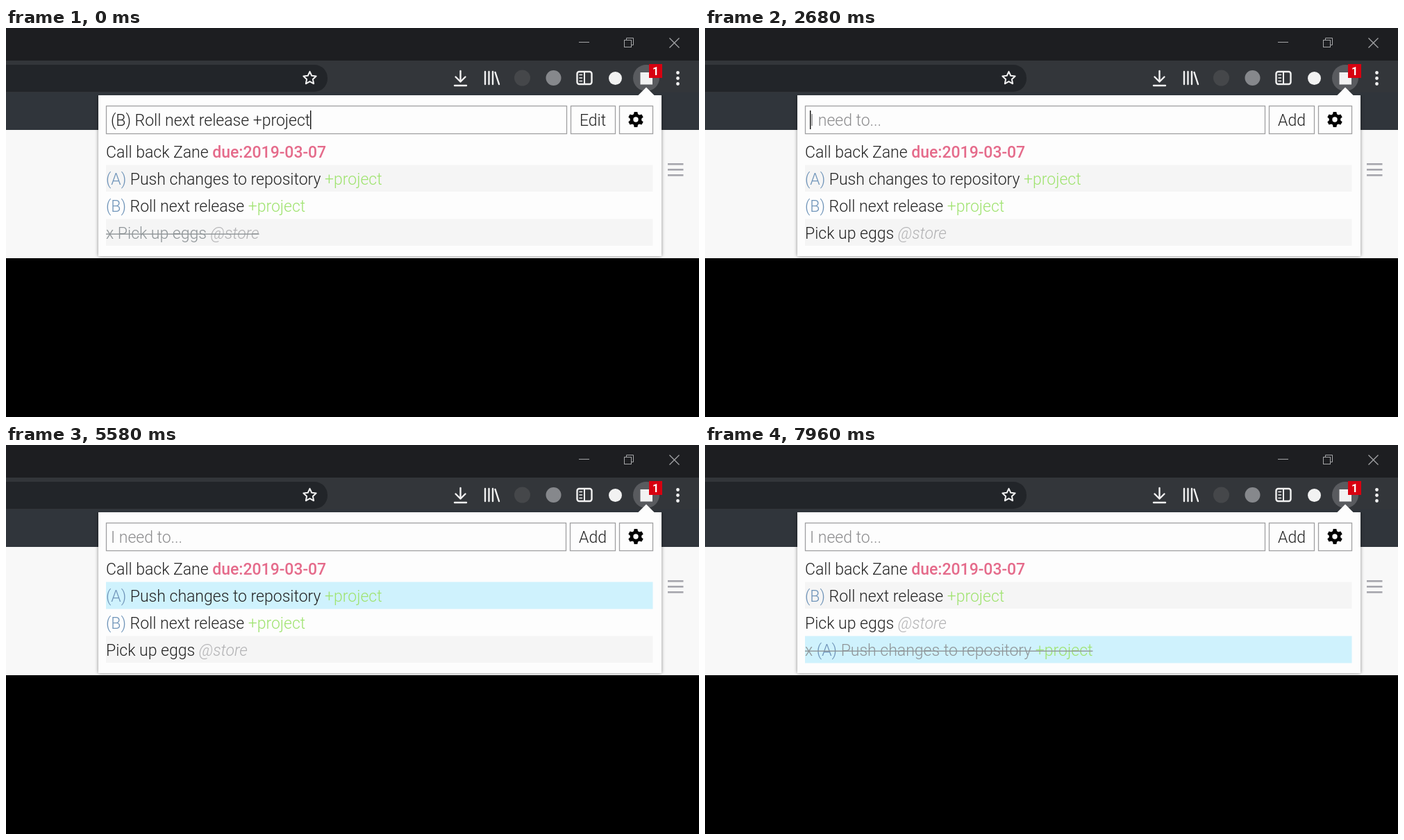
Write an HTML page with a canvas that moves like this. It is 998 by 561 pixels and loops after 8000 ms.

```html
<!DOCTYPE html>
<html lang="en">
<head>
<meta charset="utf-8">
<title>Todo popup</title>
<style>
html, body { margin: 0; width: 100%; height: 100%; overflow: hidden; background: #000; }
canvas { display: block; }
</style>
</head>
<body>
<canvas id="stage" width="998" height="561"></canvas>
<script>
const ctx = document.getElementById('stage').getContext('2d');
const LOOP = 8000;
const SIZE = 23;
const ROW_TOP = 158.5, ROW_H = 39;
const INK = '#222', BLUE = '#6f94b9', GREEN = '#9fe36f', PINK = '#e56b8b', GREY = '#b2b2b4', DONE = '#8f9598';

const call = [['Call back Zane ', INK], ['due:2019-03-07', PINK, '500']];
const push = [['(A)', BLUE], [' Push changes to repository ', INK], ['+project', GREEN]];
const roll = [['(B)', BLUE], [' Roll next release ', INK], ['+project', GREEN]];
const eggs = [['Pick up eggs ', INK], ['@store', GREY, 'italic 300']];

// Each state holds from its time until the next one.
const states = [
  { at: 0, rows: [call, push, roll, eggs], done: true, edit: true },
  { at: 20, rows: [call, push, roll, eggs] },
  { at: 1960, rows: [call, push, roll, eggs], caret: true },
  { at: 2800, rows: [call, push, roll, eggs], focus: 0 },
  { at: 3920, rows: [call, push, roll, eggs], focus: 1 },
  { at: 5600, rows: [call, roll, eggs, push], done: true, focus: 3 }
];

function box(x, y, w, h, color) {
  ctx.fillStyle = color;
  ctx.fillRect(x, y, w, h);
}

function dot(x, y, r, color) {
  ctx.fillStyle = color;
  ctx.beginPath();
  ctx.arc(x, y, r, 0, Math.PI * 2);
  ctx.fill();
}

function rounded(x, y, w, h, r) {
  ctx.beginPath();
  ctx.roundRect(x, y, w, h, r);
}

function line(color, width, ...points) {
  ctx.strokeStyle = color;
  ctx.lineWidth = width;
  ctx.beginPath();
  points.forEach(([x, y], i) => i ? ctx.lineTo(x, y) : ctx.moveTo(x, y));
  ctx.stroke();
}

function text(str, x, y, color, style = '300', size = SIZE) {
  ctx.font = `${style} ${size}px Roboto, sans-serif`;
  ctx.fillStyle = color;
  ctx.fillText(str, x, y);
  return x + ctx.measureText(str).width;
}

function windowButtons() {
  line('#a5a6a8', 1, [825, 20.5], [840, 20.5]);
  ctx.strokeRect(890.5, 17.5, 10, 10);
  line('#a5a6a8', 1, [893.5, 17], [893.5, 14.5], [903.5, 14.5], [903.5, 24.5], [901, 24.5]);
  line('#a5a6a8', 1.2, [955.5, 14.5], [969.5, 28.5]);
  line('#a5a6a8', 1.2, [969.5, 14.5], [955.5, 28.5]);
}

function star(cx, cy) {
  ctx.beginPath();
  for (let i = 0; i < 10; i++) {
    const a = -Math.PI / 2 + i * Math.PI / 5, r = i % 2 ? 4.6 : 9.6;
    ctx.lineTo(cx + r * Math.cos(a), cy + r * Math.sin(a));
  }
  ctx.closePath();
  ctx.strokeStyle = '#f2f2f2';
  ctx.lineWidth = 2;
  ctx.stroke();
}

function toolbarIcons() {
  const white = '#f2f2f2';
  ctx.lineJoin = ctx.lineCap = 'round';
  star(437.5, 72.5);
  line(white, 2.4, [654.5, 62], [654.5, 77]);
  line(white, 2.4, [647.5, 70.5], [654.5, 77.5], [661.5, 70.5]);
  line(white, 2.4, [646, 83], [663, 83]);
  for (const x of [690, 695.5, 701]) line(white, 2.4, [x, 63], [x, 81]);
  line(white, 2.4, [704.5, 64], [710, 81]);
  dot(743.5, 72, 11.5, '#45474a');
  dot(788.5, 72, 11, '#86888c');
  ctx.strokeStyle = white;
  ctx.lineWidth = 2.4;
  rounded(822.5, 63, 21, 18, 3);
  ctx.stroke();
  line(white, 2, [833, 63], [833, 81]);
  for (const y of [67.5, 72, 76.5]) line(white, 1.6, [826, y], [829.5, y]);
  dot(877.5, 72.5, 9.5, white);
  dot(922, 72, 19, '#595b5f');
  box(913.5, 64, 17.5, 17.5, white);
  box(926, 52, 19, 20, '#d70010');
  ctx.textAlign = 'center';
  text('1', 935.5, 67.5, '#fff', '700', 16);
  ctx.textAlign = 'left';
  for (const y of [64.5, 72.5, 80.5]) dot(967.5, y, 2.4, white);
  ctx.lineJoin = 'miter';
  ctx.lineCap = 'butt';
}

function browser() {
  box(0, 0, 998, 561, '#000');
  box(0, 0, 998, 47, '#1d1e21');
  box(0, 47, 998, 100, '#33363a');
  box(0, 93, 998, 54, '#30353b');
  ctx.fillStyle = '#222529';
  rounded(-30, 53, 493, 39, 19);
  ctx.fill();
  box(0, 147, 998, 185, '#f8f8f8');
  for (const y of [195, 203, 211]) box(953, y, 22.5, 2.6, '#a6a6ad');
  windowButtons();
  toolbarIcons();
}

function gear(cx, cy) {
  dot(cx, cy, 8.3, '#000');
  for (let i = 0; i < 6; i++) {
    ctx.save();
    ctx.translate(cx, cy);
    ctx.rotate(i * Math.PI / 3);
    ctx.beginPath();
    ctx.moveTo(-3.4, -6);
    ctx.lineTo(-2.3, -11);
    ctx.lineTo(2.3, -11);
    ctx.lineTo(3.4, -6);
    ctx.fill();
    ctx.restore();
  }
  dot(cx, cy, 3.7, '#fdfdfd');
}

function frame(x, right) {
  ctx.strokeStyle = '#a0a0a2';
  ctx.lineWidth = 1.3;
  ctx.strokeRect(x, 112.5, right - x, 40);
}

function popup() {
  ctx.save();
  ctx.beginPath();
  ctx.rect(0, 97, 998, 235);
  ctx.clip();
  ctx.shadowColor = 'rgba(0,0,0,.45)';
  ctx.shadowBlur = 5;
  box(133, 97, 811, 232, '#fdfdfd');
  ctx.restore();
  ctx.fillStyle = '#fdfdfd';
  ctx.beginPath();
  ctx.moveTo(910, 97.5);
  ctx.lineTo(922, 85.5);
  ctx.lineTo(934, 97.5);
  ctx.fill();
}

function form({ edit, caret }) {
  frame(144.5, edit ? 807.5 : 806.5);
  frame(edit ? 813.5 : 812.5, 877.5);
  frame(883.5, 931.5);
  gear(907, 132);
  ctx.textAlign = 'center';
  text(edit ? 'Edit' : 'Add', 845, 141, INK);
  ctx.textAlign = 'left';
  const end = edit
    ? text('(B) Roll next release +project', 151, 141, INK)
    : (text('I need to...', 151, 141, '#8b8b8d'), 151);
  if (edit || caret) box(Math.round(end), 119, 1.4, 27, '#111');
}

function row(parts, i, done, focus) {
  const top = ROW_TOP + i * ROW_H, base = 187 + i * ROW_H;
  if (focus) box(144, top, 787.5, 39, '#cff2fd');
  else if (i % 2) box(144, top, 787.5, 38.5, '#f5f5f5');
  let x = 144;
  if (done) x = text('x ', x, base, DONE);
  for (const [str, color, style] of parts) {
    x = text(str, x, base, done && color === INK ? DONE : color, style);
  }
  if (done) box(144, base - 7.5, x - 144, 1.4, DONE);
}

function draw(t) {
  const state = states.findLast(s => s.at <= t);
  browser();
  popup();
  form(state);
  state.rows.forEach((parts, i) => row(parts, i, state.done && i === 3, state.focus === i));
}

const start = performance.now();
function tick() {
  draw((performance.now() - start) % LOOP);
  requestAnimationFrame(tick);
}
tick();
</script>
</body>
</html>
```
